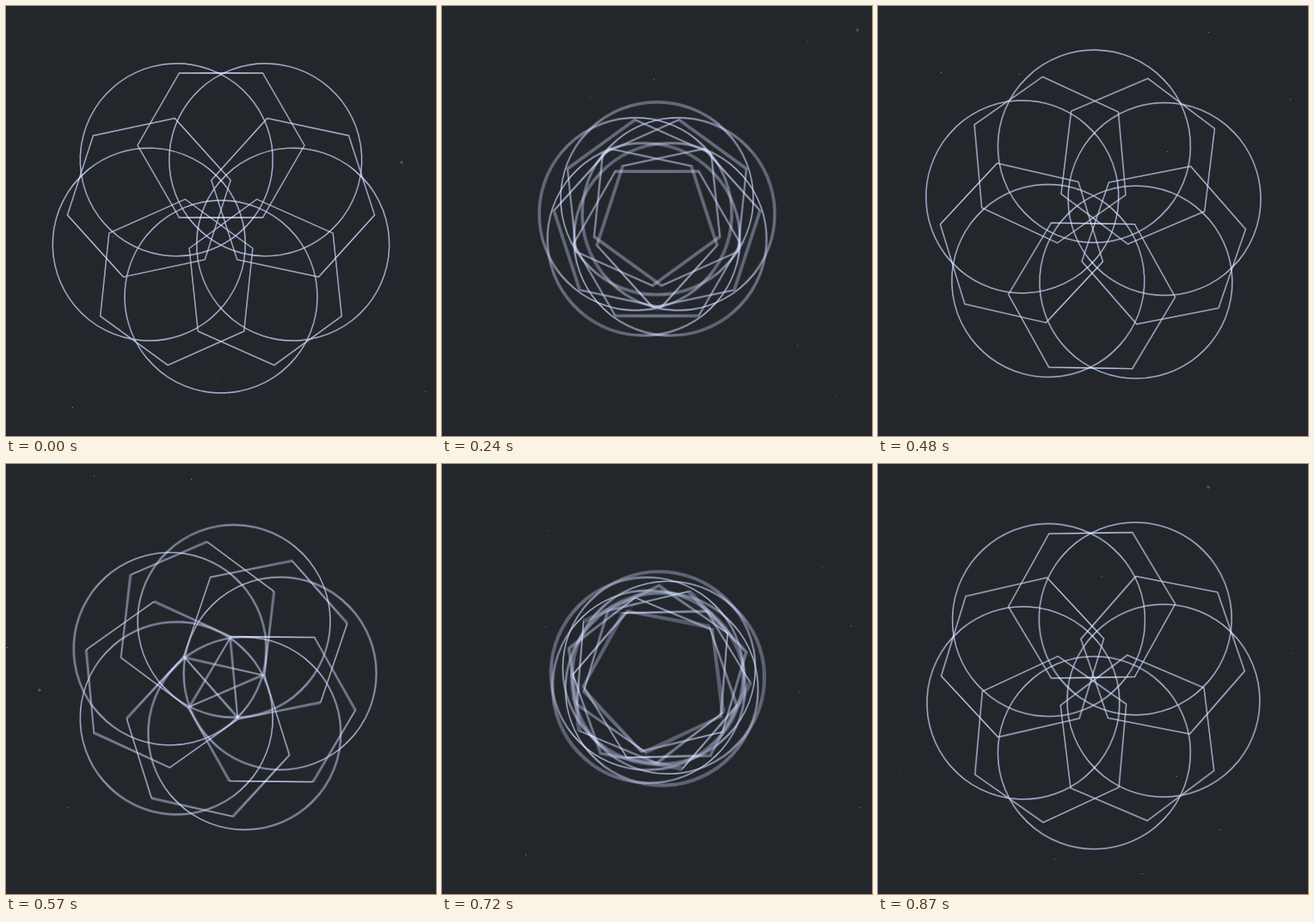
Recreate the animation shown at these times as an HTML page with a canvas. Size 500x500 px, loop 900 ms.

```html
<!DOCTYPE html>
<html>
<head>
<meta charset="utf-8">
<style>
html, body { margin: 0; width: 100%; height: 100%; overflow: hidden; background: #23272c; }
canvas { display: block; width: 500px; height: 500px; }
</style>
</head>
<body>
<canvas id="stage" width="500" height="500"></canvas>
<script>
const SIZE = 500, LOOP = 900, STEP = 30;
const REACH = 88, CIRCLE = 112, HEXAGON = 97;
const SHUTTER = 4.5, SAMPLES = 4;
const TAU = Math.PI * 2;

const stage = document.getElementById('stage').getContext('2d');
const lines = makeLayer(), streak = makeLayer();

function makeLayer() {
  const canvas = document.createElement('canvas');
  canvas.width = canvas.height = SIZE;
  return canvas.getContext('2d');
}

const smooth = s => s * s * (3 - 2 * s);

// Cubic Bezier easing (.343, 0, .504, 1), solved by bisection.
function ease(x) {
  let low = 0, high = 1;
  for (let i = 0; i < 24; i++) {
    const s = (low + high) / 2, r = 1 - s;
    if (3 * r * r * s * 0.343 + 3 * r * s * s * 0.504 + s ** 3 < x) low = s;
    else high = s;
  }
  return smooth(low);
}

// The ring turns inside out and back; the way back adds a fifth of a turn.
function pose(time) {
  const u = ((time + LOOP) % LOOP) / LOOP * 2;
  return {
    offset: REACH * (1 - 2 * ease(u < 1 ? u : 2 - u)),
    turn: smooth(Math.max(0, u - 1)) * TAU / 5
  };
}

function addRing(ctx, { offset, turn }) {
  for (let k = 0; k < 5; k++) {
    ctx.setTransform(1, 0, 0, 1, SIZE / 2, SIZE / 2);
    ctx.rotate(turn + k * TAU / 5);
    ctx.beginPath();
    ctx.arc(0, offset, CIRCLE, 0, TAU);
    ctx.stroke();
    ctx.beginPath();
    for (let i = 0; i < 6; i++) {
      const a = i * TAU / 6;
      ctx.lineTo(HEXAGON * Math.cos(a), HEXAGON * Math.sin(a) - offset);
    }
    ctx.closePath();
    ctx.stroke();
  }
  ctx.resetTransform();
}

function drawLines(time) {
  lines.clearRect(0, 0, SIZE, SIZE);
  lines.globalAlpha = 0.28;
  lines.strokeStyle = 'rgb(200,213,243)';
  lines.lineWidth = 1.4;
  for (let i = 0; i < SAMPLES; i++) {
    addRing(lines, pose(time + SHUTTER * (i / (SAMPLES - 1) - 0.5)));
  }
}

// Light smeared along one direction, keeping only its bright part.
function drawStreak(dx, dy, reach) {
  streak.globalCompositeOperation = 'source-over';
  streak.globalAlpha = 1;
  streak.fillStyle = '#000';
  streak.fillRect(0, 0, SIZE, SIZE);
  streak.drawImage(lines.canvas, -dx * reach, -dy * reach);
  streak.globalAlpha = 0.5;
  for (let s = 1; s <= reach; s *= 2) {
    streak.drawImage(streak.canvas, dx * s, dy * s);
  }
  streak.globalAlpha = 1;
  streak.globalCompositeOperation = 'color-burn';
  streak.fillStyle = 'rgb(205,202,194)';
  streak.fillRect(0, 0, SIZE, SIZE);
  stage.drawImage(streak.canvas, 0, 0);
}

function drawDust(seed) {
  let state = seed * 7919 + 17;
  const random = () => (state = (state * 16807 + 11) % 2147483647) / 2147483647;
  for (let i = 0; i < 5; i++) random();
  stage.fillStyle = stage.strokeStyle = '#b4bac4';
  stage.lineWidth = 0.7;
  for (let i = 0; i < 8; i++) {
    const x = Math.floor(random() * SIZE), y = Math.floor(random() * SIZE);
    stage.globalAlpha = 0.25 + 0.5 * random();
    if (random() < 0.15) {
      stage.beginPath();
      stage.arc(x, y, 1.2, 0, TAU);
      stage.stroke();
    } else {
      stage.fillRect(x, y, 1, 1);
    }
  }
  stage.globalAlpha = 1;
}

function draw(now) {
  const step = Math.floor(now % LOOP / STEP);
  drawLines(step * STEP);
  stage.globalCompositeOperation = 'source-over';
  stage.fillStyle = '#23272c';
  stage.fillRect(0, 0, SIZE, SIZE);
  drawDust(step + 1);
  stage.drawImage(lines.canvas, 0, 0);
  stage.globalCompositeOperation = 'lighter';
  stage.globalAlpha = 0.3;
  drawStreak(1, 0, 32);
  drawStreak(0, 1, 32);
  drawStreak(1, 1, 16);
  drawStreak(1, -1, 16);
  stage.globalAlpha = 1;
  requestAnimationFrame(draw);
}
requestAnimationFrame(draw);
</script>
</body>
</html>
```
